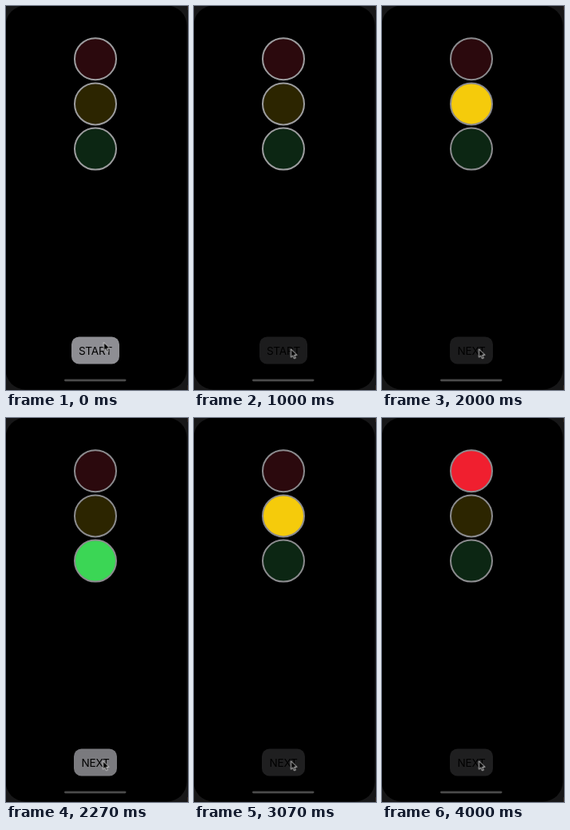
Animation, 228 px wide and 480 px high, one loop 4070 ms. Source, as an HTML page:

```html
<!DOCTYPE html>
<html lang="en">
<head>
<meta charset="utf-8">
<title>Traffic light</title>
<style>
  html, body { margin: 0; width: 100%; height: 100%; overflow: hidden; background: #171718; }
  svg { display: block; width: 228px; height: 480px; }

  .light, .rings, .button, .start, .next, .cursor { animation: 4070ms infinite; }
  .light { fill: var(--off); animation-timing-function: step-end; }
  .red { --on: #f01f2f; --off: #2b090d; animation-name: red; }
  .yellow { --on: #f5cb0b; --off: #2c2500; animation-name: yellow; }
  .green { --on: #3bd655; --off: #0c2613; animation-name: green; }
  .rings { fill: none; stroke-width: 2; animation-name: rings; animation-timing-function: step-end; }

  .button { animation-name: press; animation-timing-function: ease-in-out; }
  .button rect { fill: #8e8e93; }
  .button text { font: 13.6px Inter, "Liberation Sans", sans-serif; letter-spacing: -.2px; text-anchor: middle; }
  .start { animation-name: start; animation-timing-function: step-end; }
  .next { animation-name: next; animation-timing-function: step-end; }
  .cursor { animation-name: move; animation-timing-function: ease-in-out; }

  /* each tap advances red, yellow, green */
  @keyframes red {
    0%, 39.2%, 75.3% { fill: var(--off); }
    27.6%, 63.8%, 98.2%, 100% { fill: var(--on); }
  }
  @keyframes yellow {
    0%, 50.8%, 83.4%, 100% { fill: var(--off); }
    39.2%, 75.3% { fill: var(--on); }
  }
  @keyframes green {
    0%, 63.8%, 98.2%, 100% { fill: var(--off); }
    50.8%, 83.4% { fill: var(--on); }
  }
  @keyframes rings {
    0% { stroke: #9c9c9e; }
    27.6%, 100% { stroke: #8b8b8e; }
  }

  /* dims at once when pressed, fades back on release */
  @keyframes press {
    0%, 24.39%, 34.8%, 35.99%, 46.3%, 47.59%, 57.9%, 60.59%,
    70.5%, 71.89%, 82.09%, 90.5%, 94.99% { opacity: 1; }
    24.4%, 27.4%, 36%, 38.9%, 47.6%, 50.5%, 60.6%, 63.1%,
    71.9%, 74.7%, 82.1%, 83.1%, 95%, 97.5% { opacity: .2; }
    100% { opacity: .28; }
  }
  @keyframes start {
    0% { visibility: visible; }
    27.6%, 100% { visibility: hidden; }
  }
  @keyframes next {
    0% { visibility: hidden; }
    27.6%, 100% { visibility: visible; }
  }
  @keyframes move {
    0%, .5% { transform: translate(122.5px, 420.5px); }
    9.8%, 100% { transform: translate(121.5px, 428.7px); }
  }
</style>
</head>
<body>
<svg viewBox="0 0 228 480">
  <path d="M227 0h1v5h-1zM227 474h1v6h-1z" fill="#33271f"/>
  <rect x="-.5" y="-.5" width="227" height="480" rx="25"/>

  <circle class="light red" cx="112" cy="66.2" r="26"/>
  <circle class="light yellow" cx="112" cy="122.4" r="26"/>
  <circle class="light green" cx="112" cy="178.6" r="26"/>
  <g class="rings">
    <circle cx="112" cy="66.2" r="26"/>
    <circle cx="112" cy="122.4" r="26"/>
    <circle cx="112" cy="178.6" r="26"/>
  </g>

  <g class="button">
    <g class="start">
      <rect x="82" y="413.5" width="60" height="34" rx="9.5"/>
      <text x="112" y="435.5">START</text>
    </g>
    <g class="next">
      <rect x="85" y="413.5" width="54" height="34" rx="9.5"/>
      <text x="112" y="435.5">NEXT</text>
    </g>
  </g>

  <rect x="73" y="466.4" width="77.5" height="2.8" rx="1.4" fill="#4a4a4a"/>
  <path class="cursor" d="M0 0V10.4L2.4 8.2L4 12L5.8 11.2L4.2 7.5L7.5 7.4Z"
        stroke="#e2e2e2" stroke-width=".9" stroke-linejoin="round"/>
</svg>
</body>
</html>
```
